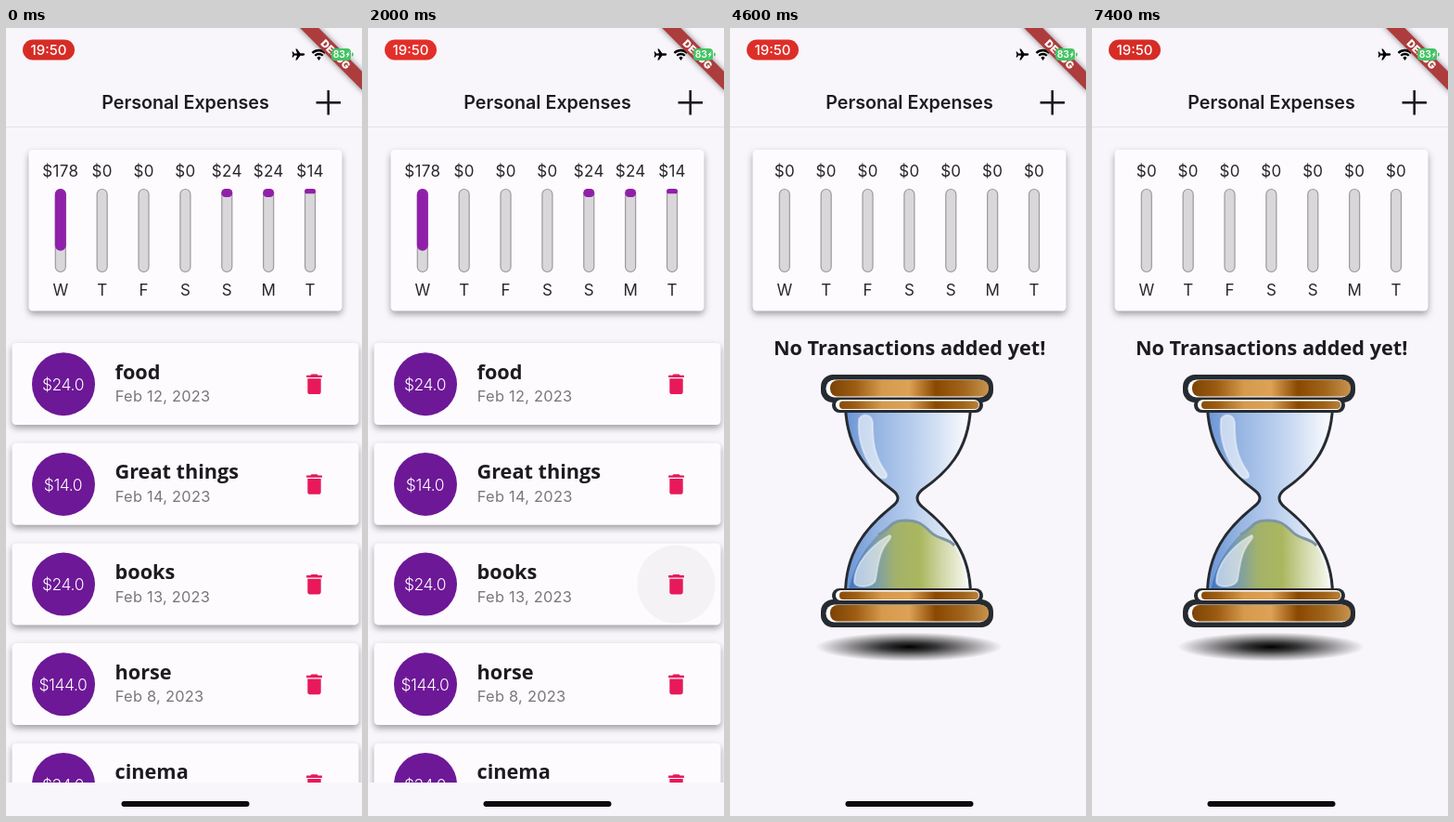
Recreate the animation shown at these times as an HTML page with a canvas. Size 384 by 848 pixels, loop 7500 ms.

```html
<!DOCTYPE html>
<html lang="en">
<head>
<meta charset="utf-8">
<title>Personal Expenses</title>
<style>
html, body { margin: 0; width: 100%; height: 100%; overflow: hidden; background: #f9f6fb; }
canvas { display: block; width: 384px; height: 848px; }
</style>
</head>
<body>
<canvas id="stage"></canvas>
<script>
const W = 384, H = 848, LOOP = 7500;
const canvas = document.getElementById('stage');
const dpr = window.devicePixelRatio || 1;
canvas.width = W * dpr;
canvas.height = H * dpr;
const c = canvas.getContext('2d');

const SANS = 'Inter, Roboto, sans-serif';
const OPEN = '"Open Sans", "Noto Sans", sans-serif';
const BG = '#f9f6fb', CARD = '#fdfbfe', INK = '#1d1b20';
const ROW = 107.7, LIST_TOP = 329, LIST_BOTTOM = 812;
const DAYS = ['W', 'T', 'F', 'S', 'S', 'M', 'T'];

// gone: the moment the entry is deleted; row: where it is tapped
const items = [
  { name: 'food', date: 'Feb 12, 2023', cost: 24, day: 4, gone: 4250, row: 0 },
  { name: 'Great things', date: 'Feb 14, 2023', cost: 14, day: 6, gone: 3700, row: 1 },
  { name: 'books', date: 'Feb 13, 2023', cost: 24, day: 5, gone: 2100, row: 2 },
  { name: 'horse', date: 'Feb 8, 2023', cost: 144, day: 0, gone: 2550, row: 2 },
  { name: 'cinema', date: 'Feb 8, 2023', cost: 34, day: 0, gone: 3050, row: 2 }
];

const trash = new Path2D('M6 19c0 1.1.9 2 2 2h8c1.1 0 2-.9 2-2V7H6v12zM19 4h-3.5l-1-1h-5l-1 1H5v2h14V4z');
const plane = new Path2D('M8 0C8 1 7 1.3 6 1.3L2.6 1.3 -1.2 6.6 -3 6.6 -1 1.3 -4.3 1.2 -5.8 3.2 -7.2 3.2 -6.3 0 -7.2 -3.2 -5.8 -3.2 -4.3 -1.2 -1 -1.3 -3 -6.6 -1.2 -6.6 2.6 -1.3 6 -1.3C7 -1.3 8 -1 8 0Z');
const bolt = new Path2D('M3.4 -4.6 -1.8 .7H.3L-.8 4.6 3.4 -.8H1.2Z');
const glass = new Path2D('M126 408C128 455 152 478 176 496Q189 506 176 516C146 540 126 566 126 610H258C258 566 236 540 206 516Q195 506 206 496C232 478 256 455 258 408Z');
const sand = new Path2D('M128 610C130 585 143 562 160 545C171 541 173 530 187 530C202 529 208 534 217 543C226 551 236 549 242 557C251 572 255 590 255 610Z');
const ridge = new Path2D('M160 545C171 541 173 530 187 530C202 529 208 534 217 543C226 551 236 549 242 557');
const shineTop = new Path2D('M139 421C143 414 153 415 154 425C154 443 155 460 168 478C172 485 165 487 159 481C144 464 137 441 139 421Z');
const shineLow = new Path2D('M170 547C175 544 174 549 170 553C161 564 160 577 157 594C155 602 135 604 134 596C134 577 152 557 170 547Z');

const clamp = x => Math.max(0, Math.min(1, x));
const smooth = x => { x = clamp(x); return x * x * (3 - 2 * x); };
const scrollAt = t => 108.4 * (smooth((t - 830) / 260) - smooth((t - 1250) / 502));

function text(s, x, y, font, color, align = 'left', spacing = 0) {
  c.font = font;
  c.fillStyle = color;
  c.textAlign = align;
  c.letterSpacing = spacing + 'px';
  c.fillText(s, x, y);
}

function box(x, y, w, h, r, fill) {
  c.beginPath();
  c.roundRect(x, y, w, h, r);
  c.fillStyle = fill;
  c.fill();
}

function disc(x, y, r, fill) {
  c.beginPath();
  c.arc(x, y, r, 0, 7);
  c.fillStyle = fill;
  c.fill();
}

function stamp(path, x, y, scale, fill) {
  c.save();
  c.translate(x, y);
  c.scale(scale, scale);
  c.fillStyle = fill;
  c.fill(path);
  c.restore();
}

function ramp(x0, x1, colors) {
  const g = c.createLinearGradient(x0, 0, x1, 0);
  colors.forEach((col, i) => g.addColorStop(i / (colors.length - 1), col));
  return g;
}

function card(x, y, w, h) {
  c.save();
  c.shadowColor = 'rgba(0,0,0,.36)';
  c.shadowBlur = 7 * dpr;
  c.shadowOffsetY = 3.5 * dpr;
  box(x, y, w, h, 4.5, CARD);
  c.restore();
}

function chart(live) {
  card(24.5, 131, 338, 173.5);
  const total = live.reduce((sum, it) => sum + it.cost, 0);
  DAYS.forEach((day, i) => {
    const x = 58.8 + i * 44.87;
    const sum = live.reduce((s, it) => s + (it.day === i ? it.cost : 0), 0);
    text('$' + sum, x, 160.3, '400 17px ' + SANS, '#29272b', 'center', .3);
    box(x - 5.5, 173.5, 11, 89, 5.5, '#d9d7da');
    c.strokeStyle = '#9b999d';
    c.lineWidth = 1.2;
    c.stroke();
    if (sum) box(x - 6, 173, 12, 90 * sum / total, 6, '#9020a9');
    text(day, x, 287.5, '400 17px ' + SANS, '#29272b', 'center');
  });
}

function ripple(t, row) {
  let a = 0;
  for (const it of items) {
    if (it.row !== row) continue;
    a = Math.max(a, smooth((t - it.gone + 150) / 100) * (1 - smooth((t - it.gone - 60) / 200)));
  }
  return a;
}

function list(t, live) {
  c.save();
  c.beginPath();
  c.rect(0, LIST_TOP, W, LIST_BOTTOM - LIST_TOP);
  c.clip();
  live.forEach((it, i) => {
    const y = 339 + i * ROW - scrollAt(t);
    card(6.5, y, 374, 88);
    disc(62, y + 44.2, 34, '#6d1897');
    text('$' + it.cost.toFixed(1), 61.5, y + 51, '300 17.4px ' + SANS, '#fff', 'center', -.4);
    text(it.name, 117.5, y + 38.6, '700 21.7px ' + OPEN, INK);
    text(it.date, 117.8, y + 63.3, '400 16.4px ' + SANS, '#79777c', 'left', .25);
    const a = ripple(t, i);
    if (a) disc(332.5, y + 44.3, 42.3, `rgba(0,0,0,${.065 * a})`);
    stamp(trash, 332.5 - 14.4, y + 44.3 - 14.4, 1.2, '#e8195a');
  });
  c.restore();
}

function cap(wideY, thinY, wideGold, thinGold) {
  const gold = ramp(106, 280, ['#7b4204', '#9c5c12', '#d59a4c', '#dda256', '#8a4800', '#a0641a', '#c99450']);
  const dark = '#262b31';
  box(98, wideY, 186, 30, 13, dark);
  box(110, thinY, 163, 16, 8, dark);
  box(103.5, wideY + 5.5, 175, 19, 9, '#fff');
  box(114, thinY + 2, 155, 11, 5.5, '#fff');
  box(108, wideGold, 171, 17.5, 8, gold);
  box(118, thinGold, 150, 8.5, 4, gold);
}

function hourglass() {
  c.save();
  c.translate(193, 666);
  c.scale(1, .155);
  const g = c.createRadialGradient(0, 0, 0, 0, 0, 101);
  g.addColorStop(0, '#000');
  g.addColorStop(.3, 'rgba(0,0,0,.78)');
  g.addColorStop(1, 'rgba(0,0,0,0)');
  disc(0, 0, 101, g);
  c.restore();

  c.lineJoin = 'round';
  c.strokeStyle = '#262b31';
  c.lineWidth = 6;
  c.stroke(glass);
  c.fillStyle = ramp(127, 257, ['#6d97d6', '#97b5e2', '#b3caec', '#d4e1f4', '#fbfcfe']);
  c.fill(glass);

  c.save();
  c.clip(glass);
  c.fillStyle = ramp(128, 256, ['#3f74c4', '#7399b4', '#a3b26a', '#aab75f', '#d3d9ab', '#f7f8ee']);
  c.fill(sand);
  c.strokeStyle = '#7d95a5';
  c.lineWidth = 3;
  c.stroke(ridge);
  c.restore();

  for (const shine of [shineTop, shineLow]) {
    c.fillStyle = 'rgba(255,255,255,.58)';
    c.fill(shine);
    c.strokeStyle = 'rgba(255,255,255,.4)';
    c.lineWidth = 2;
    c.stroke(shine);
  }
  cap(373, 398, 379, 401.5);
  cap(615, 603, 621, 606.5);
}

function statusBar(t) {
  const glow = .5 - .5 * Math.cos(t / 2500 * 2 * Math.PI);
  const mix = (a, b) => Math.round(a + (b - a) * glow);
  box(18, 12.5, 56, 22, 11, `rgb(${mix(214, 250)},${mix(44, 54)},${mix(38, 48)})`);
  text('19:50', 46, 29, '500 15px ' + SANS, '#fff', 'center');

  stamp(plane, 315, 28.5, .9, '#000');
  c.strokeStyle = '#000';
  c.lineWidth = 2.3;
  for (const r of [6, 10]) {
    c.beginPath();
    c.arc(337.5, 34, r, -Math.PI * .75, -Math.PI * .25);
    c.stroke();
  }
  c.beginPath();
  c.moveTo(337.5, 35);
  c.arc(337.5, 34, 3, -Math.PI * .75, -Math.PI * .25);
  c.fillStyle = '#000';
  c.fill();
}

function banner() {
  c.save();
  c.translate(W, 0);
  c.rotate(Math.PI / 4);
  c.shadowColor = 'rgba(0,0,0,.5)';
  c.shadowBlur = 6 * dpr;
  c.fillStyle = '#ad3c3d';
  c.fillRect(-50, 33, 100, 14.2);
  c.shadowColor = 'transparent';
  text('DEBUG', 0, 44.2, '900 11.3px ' + SANS, '#fff', 'center');
  c.restore();
}

function battery() {
  box(351, 22, 21, 13, 4, '#43c463');
  box(373, 26.5, 1.6, 4, 1, '#43c463');
  text('83', 359.2, 32.4, '600 10.5px ' + SANS, '#fff', 'center', -.3);
  stamp(bolt, 368, 28.5, .85, '#fff');
}

function draw(t) {
  c.setTransform(dpr, 0, 0, dpr, 0, 0);
  c.fillStyle = BG;
  c.fillRect(0, 0, W, H);
  const live = items.filter(it => t < it.gone);

  chart(live);
  if (live.length) list(t, live);
  else {
    text('No Transactions added yet!', 193.7, 352, '700 21.7px ' + OPEN, INK, 'center');
    hourglass();
  }

  c.fillStyle = '#e5e2e8';
  c.fillRect(0, 106, W, 1);
  text('Personal Expenses', 193.5, 87, '600 19.7px ' + SANS, INK, 'center');
  c.fillStyle = INK;
  c.fillRect(334.5, 79, 26.5, 2.6);
  c.fillRect(346.4, 67, 2.6, 26.5);

  statusBar(t);
  banner();
  battery();
  box(124.5, 832, 138, 6, 3, '#0b0b0d');
}

const start = performance.now();
function tick() {
  draw((performance.now() - start) % LOOP);
  requestAnimationFrame(tick);
}
draw(0);
requestAnimationFrame(tick);
</script>
</body>
</html>
```
